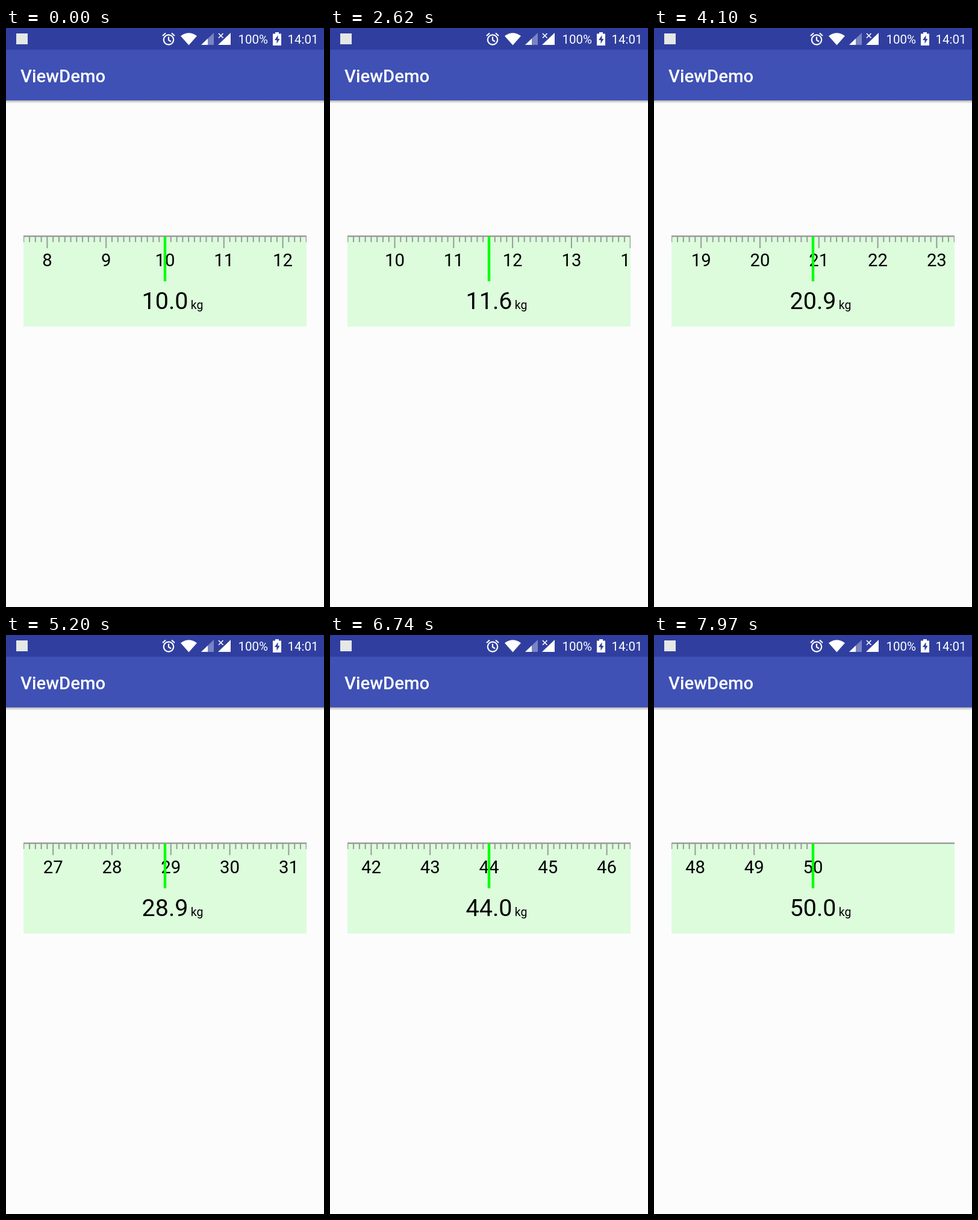
An HTML page that plays this animation: 528 px wide and 960 px high, repeating every 8000 ms.

```html
<!DOCTYPE html>
<html lang="en">
<head>
<meta charset="utf-8">
<title>ViewDemo</title>
<style>
  html, body { margin: 0; width: 100%; height: 100%; overflow: hidden; background: #fcfcfc; }
  svg { display: block; width: 528px; height: 960px; font-family: Roboto, sans-serif; }
  .status { font-size: 20.5px; fill: #fff; }
  .title { font-size: 29.33px; font-weight: 500; fill: #fff; }
  .label { font-size: 29.33px; text-anchor: middle; }
  .value { font-size: 39.5px; text-anchor: middle; }
  .unit { font-size: 19.5px; }
</style>
</head>
<body>
<svg viewBox="0 0 528 960">
  <defs>
    <clipPath id="window"><rect x="29" y="344" width="470" height="151"/></clipPath>
    <linearGradient id="shade" x2="0" y2="1">
      <stop stop-color="#b4b4b0"/>
      <stop offset="1" stop-color="#fcfcfc"/>
    </linearGradient>
  </defs>

  <rect width="528" height="960" fill="#fcfcfc"/>
  <rect y="120" width="528" height="5" fill="url(#shade)"/>
  <rect y="36" width="528" height="84" fill="#3f51b5"/>
  <rect width="528" height="36" fill="#303f9f"/>
  <text class="title" x="24" y="90">ViewDemo</text>

  <!-- status bar -->
  <rect x="17" y="9" width="19" height="18" fill="#e4e8e6"/>
  <g fill="none" stroke="#fff" stroke-width="2.2">
    <circle cx="270" cy="19.5" r="8.2"/>
    <path d="M260 13l5-4.5M280 13l-5-4.5M270 14.5v5.5l4 2.5"/>
  </g>
  <path d="M290 13.2Q303.5 3.5 317 13.2L303.5 28.5Z" fill="#fff"/>
  <path d="M345 8V28H324Z" fill="#7a84c2"/>
  <path d="M335 17.5V28H324Z" fill="#fff"/>
  <path d="M373 8V28H352Z" fill="#fff"/>
  <path d="M353 9l7.5 7.5M360.5 9l-7.5 7.5" stroke="#fff" stroke-width="1.7"/>
  <path d="M443 9.5H447V7H453V9.5H457V29H443Z" fill="#fff"/>
  <path d="M451.5 12L446 20H449.5V26L454.5 18H451.5Z" fill="#303f9f"/>
  <text class="status" x="385.5" y="26">100%</text>
  <text class="status" x="467.5" y="26">14:01</text>

  <!-- ruler -->
  <g clip-path="url(#window)">
    <rect x="29" y="344" width="470" height="151" fill="#dcfcdc"/>
    <g id="scale">
      <path id="ticks" fill="none" stroke="#999" stroke-width="2"/>
    </g>
    <rect x="29" y="344" width="470" height="2.4" fill="#999"/>
    <rect x="261.8" y="346" width="4.4" height="74" fill="#0f0"/>
  </g>
  <text id="value" class="value" x="264" y="465.5">10.0</text>
  <text class="unit" x="306.8" y="465.5">kg</text>
</svg>
<script>
  const LOOP = 8000, UNIT = 97.8, CENTER = 264, MAX = 50;

  // [time in ms, weight in kg]
  const steps = [
    [0, 10], [390, 10], [710, 10.3], [910, 10.3], [1580, 10.8],
    [2070, 11.2], [2230, 11.2], [3160, 13.2], [4100, 20.9],
    [5200, 28.9], [6740, 44], [7960, 50], [LOOP, 50]
  ];

  const scale = document.getElementById('scale');
  const value = document.getElementById('value');

  let path = '';
  for (let i = 0; i <= MAX * 10; i++) {
    path += `M${(i * UNIT / 10).toFixed(2)} 345V${i % 10 ? 355 : 365}`;
  }
  document.getElementById('ticks').setAttribute('d', path);

  for (let kg = 0; kg <= MAX; kg++) {
    const label = document.createElementNS('http://www.w3.org/2000/svg', 'text');
    label.setAttribute('class', 'label');
    label.setAttribute('x', kg * UNIT);
    label.setAttribute('y', 395);
    label.textContent = kg;
    scale.append(label);
  }

  const rates = steps.slice(1).map(([t, w], i) => (w - steps[i][1]) / (t - steps[i][0]));

  // The harmonic mean keeps the curve from overshooting and rests it at pauses.
  function slopeAt(i) {
    const a = rates[i - 1] || 0, b = rates[i] || 0;
    return a * b > 0 ? 2 * a * b / (a + b) : 0;
  }

  function weightAt(time) {
    const next = steps.findIndex(([t]) => t > time);
    const [t0, w0] = steps[next - 1];
    const [t1, w1] = steps[next];
    const span = t1 - t0, u = (time - t0) / span, v = 1 - u;
    const weight = w0 * v * v * (1 + 2 * u) + w1 * u * u * (1 + 2 * v)
      + span * u * v * (slopeAt(next - 1) * v - slopeAt(next) * u);
    return Math.floor(weight * 10 + 1e-6) / 10;
  }

  function draw(time) {
    const weight = weightAt(time % LOOP);
    scale.setAttribute('transform', `translate(${CENTER - weight * UNIT} 0)`);
    value.textContent = weight.toFixed(1);
  }

  const start = performance.now();
  function tick() {
    draw(performance.now() - start);
    requestAnimationFrame(tick);
  }
  tick();
</script>
</body>
</html>
```
